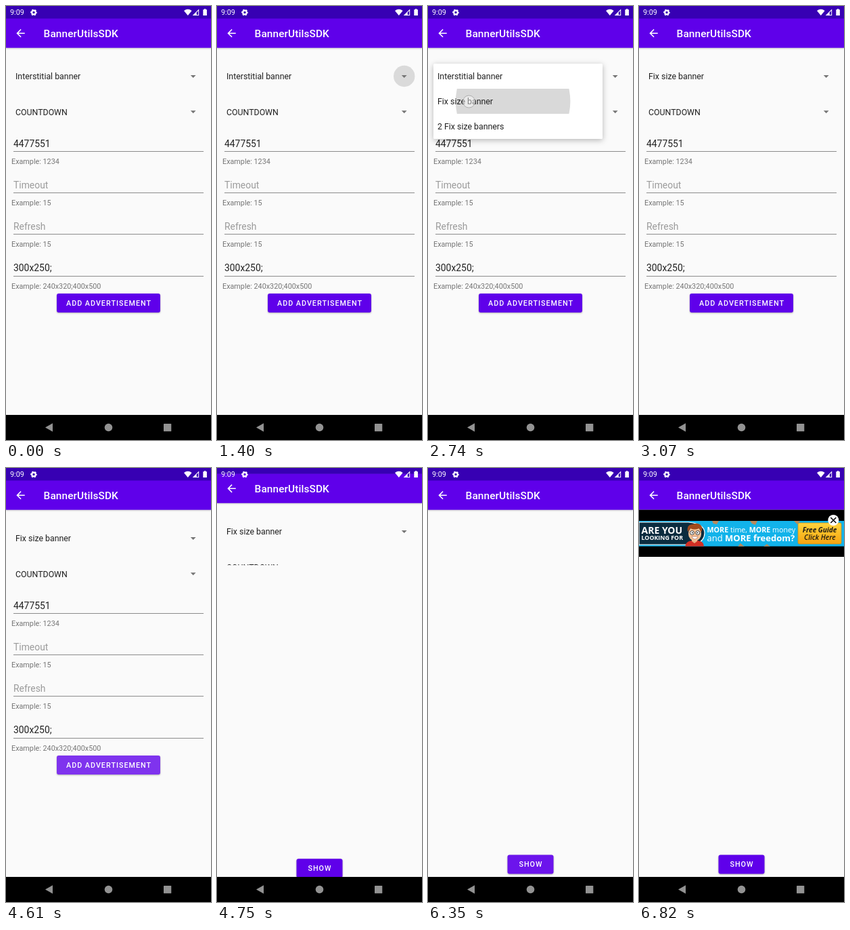
An HTML page for the animation above (8000 ms loop, 303 by 640 pixels).

```html
<!DOCTYPE html>
<html lang="en">
<head>
<meta charset="utf-8">
<title>Banner demo</title>
<style>
  html, body { margin: 0; width: 100%; height: 100%; overflow: hidden; background: #000; }
  svg { display: block; width: 100vw; height: 100vh; }
  text { font-family: Roboto, sans-serif; white-space: pre; }
  .item { font-size: 12.35px; fill: #212121; }
  .field { font-size: 13.9px; fill: #212121; }
  .empty { fill: #9b9b9b; }
  .hint { font-size: 10.8px; fill: #757575; }
  .label { font-size: 10.8px; font-weight: 500; letter-spacing: .0893em; fill: #fff; text-anchor: middle; }
  .button { fill: #5f00ea; filter: drop-shadow(0 1px 1px rgba(0,0,0,.3)); }
  .card { fill: #fff; filter: drop-shadow(0 2px 4px rgba(0,0,0,.28)); }
  .ad text { font-family: "Open Sans", sans-serif; fill: #fff; }
  .ad .dark { fill: #1d1a12; font-style: italic; text-anchor: middle; }
  .b { font-weight: 700; }
</style>
</head>
<body>
<svg viewBox="0 0 303 640" preserveAspectRatio="none">
  <defs>
    <linearGradient id="gold" x2="0" y2="1">
      <stop stop-color="#ffd43c"/><stop offset="1" stop-color="#f6a410"/>
    </linearGradient>
    <clipPath id="enterClip"><rect id="enterRect" width="303" height="640"/></clipPath>
    <clipPath id="popupClip"><rect id="popupRect" x="8" y="85" width="250" height="111"/></clipPath>
    <clipPath id="rowClip"><rect x="8" y="122" width="250" height="37"/></clipPath>
    <clipPath id="addClip"><rect x="75" y="424" width="153" height="28" rx="3"/></clipPath>
    <clipPath id="showClip"><rect x="117.5" y="570.5" width="68" height="28" rx="3"/></clipPath>
    <clipPath id="adClip"><rect y="78" width="303" height="37.5"/></clipPath>
    <g id="window">
      <rect width="303" height="640" fill="#fafafa"/>
      <rect y="18" width="303" height="43.7" fill="#5f00ea" style="filter:drop-shadow(0 1px 1px rgba(0,0,0,.2))"/>
      <rect width="303" height="18.5" fill="#3700b3"/>
      <path transform="translate(12.3 30.9) scale(.7716)" fill="#fff"
        d="M20 11H7.83l5.59-5.59L12 4l-8 8 8 8 1.41-1.41L7.83 13H20z"/>
      <text x="55.6" y="46.3" font-size="15.4" font-weight="500" letter-spacing=".1" fill="#fff">BannerUtilsSDK</text>
    </g>
  </defs>

  <g id="formScene">
    <use href="#window"/>
    <circle id="arrowRipple" cx="276.7" cy="103.5" fill="#000"/>
    <text id="choice" class="item" x="14" y="108.4"></text>
    <text class="item" x="14" y="160.9">COUNTDOWN</text>
    <path d="M272.8 102h7.8l-3.9 3.9zM272.8 154.3h7.8l-3.9 3.9z" fill="#757575"/>
    <g id="fields"></g>
    <rect class="button" x="75" y="424" width="153" height="28" rx="3"/>
    <g clip-path="url(#addClip)"><circle id="addRipple" fill="#fff"/></g>
    <text class="label" x="152" y="442">ADD ADVERTISEMENT</text>
  </g>

  <g id="popup">
    <rect id="card" class="card" x="8" y="85" width="250" height="111" rx="1.5"/>
    <g clip-path="url(#popupClip)">
      <g clip-path="url(#rowClip)"><circle id="rowRipple" cy="140.5" fill="#000"/></g>
      <text class="item" x="14" y="108.4">Interstitial banner</text>
      <text class="item" x="14" y="145.4">Fix size banner</text>
      <text class="item" x="14" y="182.4">2 Fix size banners</text>
    </g>
  </g>

  <g id="showScene" clip-path="url(#enterClip)">
    <g id="showWindow">
      <use href="#window"/>
      <rect class="button" x="117.5" y="570.5" width="68" height="28" rx="3"/>
      <g clip-path="url(#showClip)"><circle id="showRipple" fill="#fff"/></g>
      <text class="label" x="152" y="588.4">SHOW</text>
    </g>
  </g>

  <rect id="strip" y="61.7" width="303" height="69.3"/>
  <g id="ad" class="ad">
    <g clip-path="url(#adClip)">
      <rect y="78" width="303" height="38" fill="#12b3ea"/>
      <g fill="#b98a5c">
        <path d="M108 78h10l-3 5-5-1zM164 78h11l-3 6-5-2zM229 78h9l-4 5zM146 116l4-5 6 5zM184 116l5-4 5 4z"/>
      </g>
      <path d="M0 80H73Q97 82 97 96Q97 107 84 113H0Z" fill="#0b2c3f" stroke="#fff" stroke-width="1.2"/>
      <path d="M68 116q1-8 10-9h9q9 1 9 9z" fill="#d32f24"/>
      <path d="M78 104h8v4l-4 3-4-3z" fill="#eab184"/>
      <ellipse cx="82.5" cy="97" rx="9.5" ry="10.5" fill="#f6c297"/>
      <path d="M72 94Q70 83 80 83Q86 80 91 84Q95 88 92 95L89 89Q81 92 76 89Z" fill="#a34a1c"/>
      <g fill="#fff" stroke="#222" stroke-width=".9">
        <circle cx="78.5" cy="95.5" r="3"/><circle cx="86.8" cy="95.5" r="3"/>
      </g>
      <g fill="#222"><circle cx="78.8" cy="95.6" r="1"/><circle cx="86.5" cy="95.6" r="1"/></g>
      <path d="M78 101h9q-1 4-4.500 4T78 101z" fill="#fff" stroke="#8a3a20" stroke-width=".5"/>
      <text class="b" x="3.500" y="97.300" font-size="14">ARE YOU</text>
      <text class="b" x="3.500" y="106.300" font-size="8.900">LOOKING FOR</text>
      <text x="100.500" y="94.500" font-size="10.700"><tspan class="b">MORE</tspan> time, <tspan class="b">MORE</tspan> money</text>
      <text x="100.500" y="107.500" font-size="13">and <tspan class="b">MORE freedom?</tspan></text>
      <rect x="235" y="81" width="64" height="31" rx="2" fill="url(#gold)" stroke="#d88a0c" stroke-width=".7"/>
      <text class="dark b" x="267" y="95" font-size="10">Free Guide</text>
      <text class="dark" font-weight="600" x="267.300" y="106" font-size="10.300">Click Here</text>
    </g>
    <circle cx="287.300" cy="77" r="8" fill="#fff"/>
    <path d="M283.300 73l8 8m0-8l-8 8" stroke="#000" stroke-width="1.500"/>
  </g>

  <g fill="#fff">
    <text x="6" y="13.400" font-size="10.800">9:09</text>
    <circle cx="41" cy="9.500" r="2.800" fill="none" stroke="#fff" stroke-width="2.200"/>
    <circle cx="41" cy="9.500" r="4.200" fill="none" stroke="#fff" stroke-width="1.400" stroke-dasharray="2.200 2.198" stroke-dashoffset="1.100"/>
    <path d="M263 6.900Q268.800 2.600 274.600 6.900L268.800 14z"/>
    <path d="M285.200 4.500V14h-9.500z"/>
    <path d="M284.200 7v6h-2.500V9.500z" fill="#3700b3"/>
    <path d="M291.300 5.300h1.700V4.200h2.200v1.100h1.700V14h-5.600z"/>
  </g>
  <rect y="603" width="303" height="37"/>
  <g fill="#929292">
    <path d="M58 621.500l11-6.200v12.400z"/>
    <circle cx="151.500" cy="621.500" r="5.800"/>
    <rect x="233" y="616" width="11.300" height="11.300" rx=".6"/>
  </g>
  <circle id="touch" r="9" fill="#fff" fill-opacity=".45" stroke="#999" stroke-opacity=".7"/>
</svg>
<script>
const LOOP = 8000, TICK = 66.8;
const el = Object.fromEntries([...document.querySelectorAll('[id]')].map(n => [n.id, n]));
const set = (node, attrs) => { for (const k in attrs) node.setAttribute(k, attrs[k]); };
const ramp = (t, from, to) => Math.min(1, Math.max(0, (t - from) / (to - from)));
const mix = (a, b, p) => a + (b - a) * p;
const easeOut = p => 1 - (1 - p) ** 2;
const visible = (node, on) => set(node, { visibility: on ? 'visible' : 'hidden' });

const fields = [['4477551', '1234'], ['Timeout', '15', 'empty'], ['Refresh', '15', 'empty'], ['300x250;', '240x320;400x500']];
el.fields.innerHTML = fields.map(([value, example, state = ''], i) => {
  const y = i * 61.2;
  return `<text class="field ${state}" x="11" y="${207.6 + y}">${value}</text>
    <rect x="11" y="${Math.round(214 + y)}" width="281" height="1" fill="#8c8c8c"/>
    <text class="hint" x="8" y="${232.9 + y}">Example: ${example}</text>`;
}).join('');

// Time and place of each finger press.
const touches = [[1000, 276, 104], [2470, 60.500, 141], [4140, 141.500, 445], [5950, 151, 585]];
const TOUCH_TIME = 330;

// A ripple grows from the finger towards the middle, then fades.
function ripple(node, t, { start, grow, fade, end, from, to, radius, alpha }) {
  const p = ramp(t, start, start + grow);
  set(node, {
    cx: mix(from[0], to[0], easeOut(p)),
    cy: mix(from[1], to[1], easeOut(p)),
    r: radius * p,
    opacity: alpha * (1 - ramp(t, fade, end))
  });
}

function draw(t) {
  const touch = touches.find(([at]) => t >= at && t < at + TOUCH_TIME);
  visible(el.touch, touch);
  if (touch) set(el.touch, { cx: touch[1], cy: touch[2] });

  ripple(el.arrowRipple, t, { start: 1010, grow: 300, fade: 1410, end: 1670,
    from: [276.7, 103.5], to: [276.7, 103.5], radius: 15.700, alpha: .13 });
  ripple(el.rowRipple, t, { start: 2610, grow: 190, fade: 2870, end: 3070,
    from: [60, 140.5], to: [133.5, 140.5], radius: 126, alpha: .15 });
  ripple(el.addRipple, t, { start: 4280, grow: 240, fade: 4610, end: 4880,
    from: [141.5, 445], to: [151.5, 438], radius: 79, alpha: .2 });
  ripple(el.showRipple, t, { start: 6020, grow: 200, fade: 6220, end: 6470,
    from: [151, 585], to: [151.5, 584.5], radius: 38, alpha: .16 });

  const height = mix(37, 111, easeOut(ramp(t, 1400, 1670)));
  set(el.card, { height });
  set(el.popupRect, { height });
  set(el.popup, { opacity: ramp(t, 1400, 1600) * (1 - ramp(t, 2800, 3070)) });
  el.choice.textContent = t < 2860 ? 'Interstitial banner' : 'Fix size banner';

  const slide = 1 - (1 - ramp(t, 4620, 5010)) ** 4;
  set(el.formScene, { transform: `translate(0 ${-12.8 * slide})` });
  set(el.enterRect, { y: 640 * (1 - slide) });
  set(el.showWindow, { transform: `translate(0 ${26 * (1 - slide)})` });
  visible(el.showScene, slide > 0);

  visible(el.strip, t >= 6410);
  visible(el.ad, t >= 6675);
}

function frame() {
  const t = performance.now() % LOOP;
  draw(1000 + Math.floor((t - 999) / TICK) * TICK + 1);
  requestAnimationFrame(frame);
}
frame();
</script>
</body>
</html>
```
